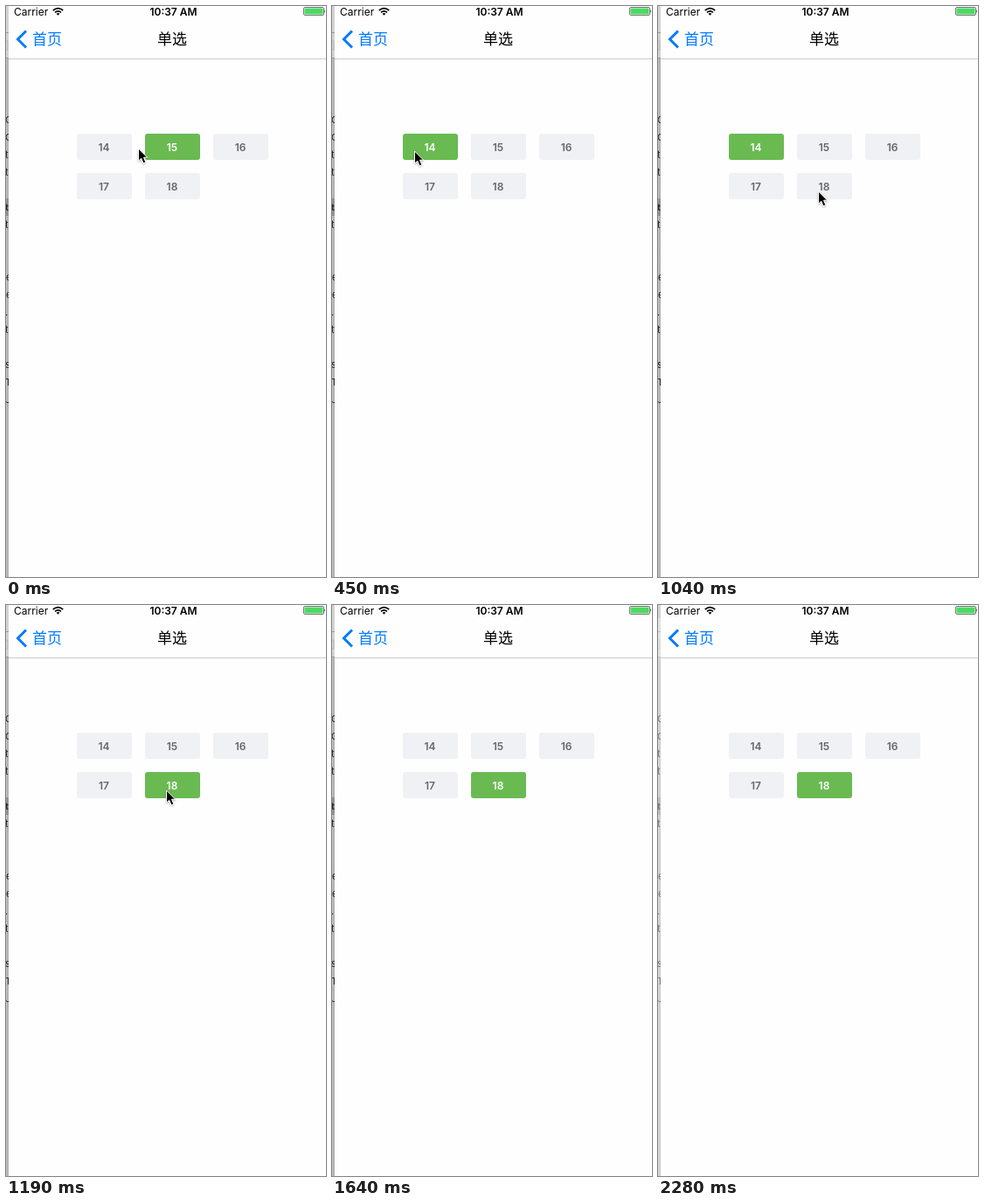
Write an HTML page that moves like this. It is 366 px wide and 653 px high and loops after 2300 ms.

```html
<!DOCTYPE html>
<html lang="zh-CN">
<head>
<meta charset="utf-8">
<style>
  html, body { margin: 0; width: 100%; height: 100%; overflow: hidden; background: #fefefe; }
  svg { display: block; width: 366px; height: 653px; font: 12px Inter, "Noto Sans CJK SC", sans-serif; }
  .bold { font-weight: 600; }
  .nav { font-size: 17px; font-family: "Noto Sans CJK SC", "Noto Sans CJK", sans-serif; }
  .mid { text-anchor: middle; }
  .option rect { fill: #f0f1f4; }
  .option text { fill: #666; }
  .option.on rect { fill: #6aba52; }
  .option.on text { fill: #fff; }
</style>
</head>
<body>
<svg viewBox="0 0 366 653">
  <defs>
    <linearGradient id="edge">
      <stop stop-color="#c2c2c2"/><stop offset="1" stop-color="#a9a9a9"/>
    </linearGradient>
    <filter id="shadow" x="-50%" y="-50%" width="200%" height="200%">
      <feDropShadow dx="0" dy="1" stdDeviation=".8" flood-opacity=".35"/>
    </filter>
  </defs>

  <!-- sliver of the window behind -->
  <rect width="3" height="653" fill="url(#edge)"/>
  <rect width="3" height="59" fill="#d2d2d2"/>
  <path d="M0 30.5H3M0 59.5H3" stroke="#999"/>
  <path d="M0 40H2V50H0" fill="none" stroke="#b5b5b5"/>
  <rect y="220" width="3" height="20" fill="#929292"/>
  <g id="behind" font-size="11" fill="#222"></g>
  <path d="M0 452.5Q1 454 3 453.5" fill="none" stroke="#222"/>
  <rect id="lighten" y="15" width="3" height="638" fill="#fff" opacity=".38"/>

  <!-- phone screen -->
  <rect x="3" width="363" height="653" fill="#fefefe"/>
  <path d="M3 60.5H366" stroke="#ccc"/>
  <text x="9" y="11">Carrier</text>
  <g fill="none" stroke="#000" stroke-width="1.7">
    <path d="M53.8 5Q59.5 .2 65.2 5M56 7.3Q59.5 4.4 63 7.3"/>
    <path d="M57.6 8.8Q59.5 7.4 61.4 8.8L59.5 10.8Z" fill="#000" stroke="none"/>
  </g>
  <text class="bold mid" x="191.5" y="11">10:37 AM</text>
  <rect x="340.5" y="1.5" width="23" height="9" rx="1.5" fill="#fff" stroke="#555" stroke-width=".8"/>
  <rect x="341.5" y="2.5" width="21" height="7" rx=".6" fill="#4cd964"/>
  <path d="M364.2 4.2Q366 6 364.2 7.8Z" fill="#333"/>
  <path d="M23 28.5L13.5 38L23 47.5" fill="none" stroke="#007aff" stroke-width="3"/>
  <text class="nav" x="30" y="44" fill="#007aff">首页</text>
  <text class="nav mid" x="190" y="44" font-weight="500">单选</text>
  <g id="options"></g>

  <g id="tip">
    <rect x="280.5" y="641.5" width="70" height="24" rx="4" fill="#f3f3f3" stroke="#bbb" filter="url(#shadow)"/>
    <text class="mid" x="315.5" y="659" font-size="14" fill="#333">备忘录</text>
  </g>
  <path id="cursor" d="M0 0V14.2L3.2 11.2L5.5 16.8L8.3 15.6L6 10.2H10.2Z"
        fill="#000" stroke="#fff" stroke-width="1" filter="url(#shadow)"/>
</svg>
<script>
const $ = id => document.getElementById(id);
const LOOP = 2300;

const behindRows = [[130, "C"], [150, "C"], [170, "t"], [190, "t"], [230, "t"], [250, "t"], [310, "re"],
  [330, "re"], [350, "."], [370, "t"], [410, "s"], [430, "T"]];
$("behind").innerHTML = behindRows.map(([y, s]) =>
  `<text x="${s === "re" ? -4 : -1}" y="${y + 4}" ${y === 230 ? 'class="bold"' : ""}>${s}</text>`).join("");

$("options").innerHTML = [14, 15, 16, 17, 18].map((n, i) => {
  const x = 81 + i % 3 * 78, y = 146 + Math.floor(i / 3) * 45;
  return `<g class="option" data-n="${n}"><rect x="${x}" y="${y}" width="63" height="30" rx="3"/>
    <text class="bold mid" x="${x + 31}" y="${y + 19.5}">${n}</text></g>`;
}).join("");
const options = [...document.querySelectorAll(".option")];

// Each entry holds from its start time: [start, value]
const cursorSteps = [[0, [151.5, 163]], [150, [99.5, 165]], [300, [94.5, 166]], [750, [186.5, 210]],
  [900, [188, 212.5]], [1040, [183.5, 212]], [1340, [338.5, 593]], [1640, null]];
const selectedSteps = [[0, 15], [450, 14], [1190, 18]];
const tipSteps = [[0, 0], [1790, 1], [2090, .7], [2280, 0]];
const at = (steps, t) => steps.findLast(([start]) => start <= t)[1];

function draw() {
  const t = performance.now() % LOOP;
  const pos = at(cursorSteps, t);
  const selected = at(selectedSteps, t);
  $("cursor").style.display = pos ? "" : "none";
  if (pos) $("cursor").setAttribute("transform", `translate(${pos})`);
  for (const o of options) o.classList.toggle("on", +o.dataset.n === selected);
  $("tip").setAttribute("opacity", at(tipSteps, t));
  $("lighten").style.display = t >= 2280 ? "" : "none";
  requestAnimationFrame(draw);
}
draw();
</script>
</body>
</html>
```
